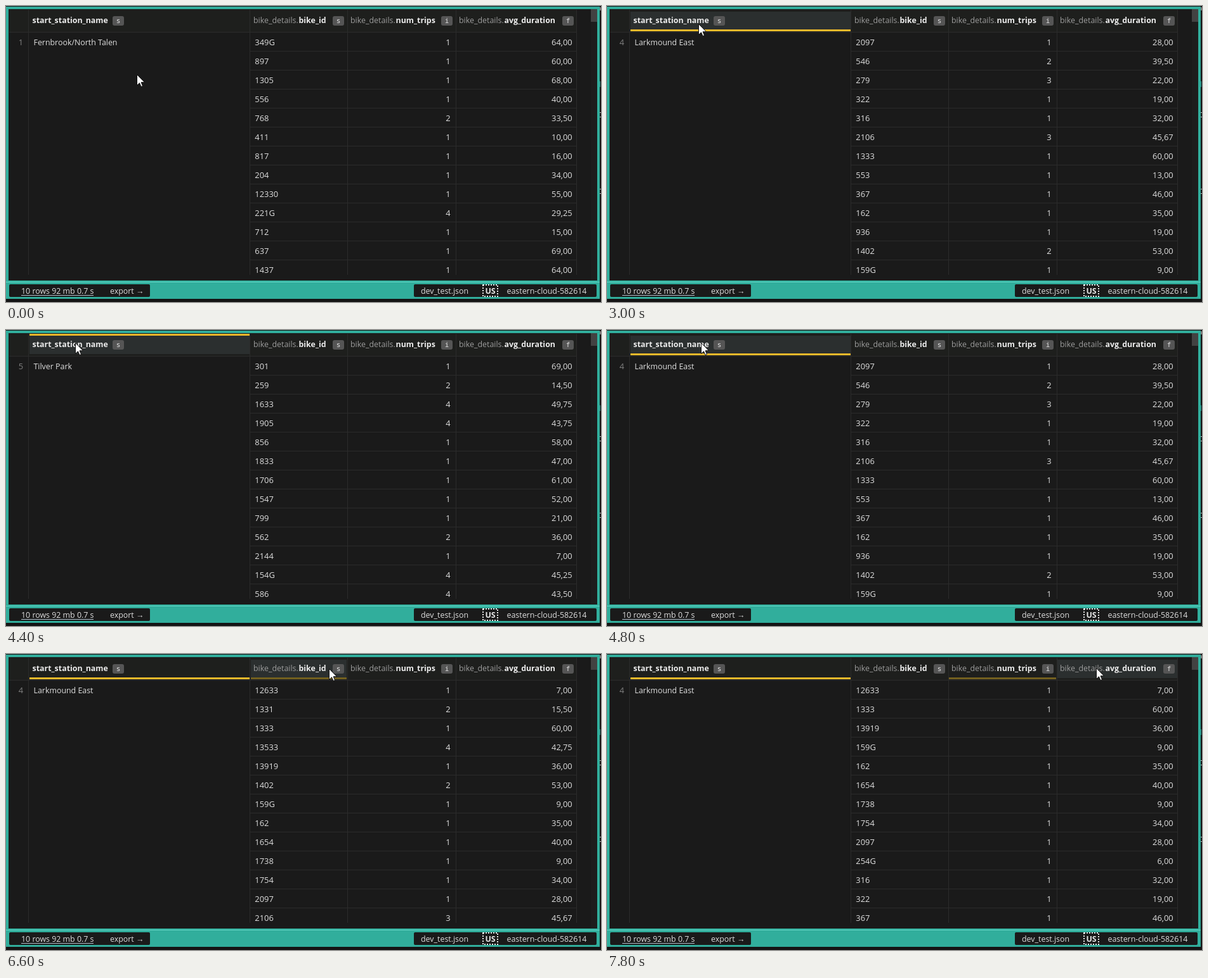
Recreate the animation shown at these times as an HTML page with a canvas. Size 938x468 px, loop 8000 ms.

```html
<!DOCTYPE html>
<html lang="en">
<head>
<meta charset="utf-8">
<title>Sortable results table</title>
<style>
  html, body { margin: 0; width: 100%; height: 100%; overflow: hidden; background: #141414; }
  canvas { display: block; }
</style>
</head>
<body>
<canvas id="stage" width="938" height="468"></canvas>
<script>
const ctx = document.getElementById('stage').getContext('2d');
const LOOP = 8000, STEP = 200, ROW = 30, VISIBLE = 13;
const TEAL = '#31ae9c', BG = '#1a1a1a', LINE = '#2b2b2b', TEXT = '#dedede';
const YELLOW = '#efb92b', DIM = '#73601f';
const SANS = '"Open Sans", "Noto Sans", sans-serif';
const BODY = `12.9px ${SANS}`, LABEL = `12.4px ${SANS}`, BOLD = `bold 12.4px ${SANS}`;
const BADGE = '11px "DejaVu Sans Mono", monospace';

const columns = [
  { x: 37, end: 384, name: 'start_station_name', badge: 's', badgeX: 168 },
  { x: 386, end: 537, nested: true, name: 'bike_id', badge: 's' },
  { x: 539, end: 708, nested: true, name: 'num_trips', badge: 'i' },
  { x: 710, end: 899, nested: true, name: 'avg_duration', badge: 'f' }
];

function randomFrom(seed) {
  return () => {
    seed = (seed * 1664525 + 1013904223) % 4294967296;
    return seed / 4294967296;
  };
}

// Bike ids mix three to five digits, some with a letter; durations are means over trips.
function makeRows(seed, firstId) {
  const random = randomFrom(seed);
  const between = (low, high) => Math.floor(low + random() * (high - low));
  const makeId = () => {
    const kind = random();
    if (kind < 0.1) return between(10, 360).toString().padStart(3, '0') + 'G';
    if (kind < 0.2) return String(between(12000, 14900));
    if (kind < 0.5) return String(between(1250, 2300));
    return String(between(100, 960));
  };
  return Array.from({ length: 32 }, (_, i) => {
    const id = i ? makeId() : firstId;
    const trips = Math.ceil(4 * random() ** 3);
    let total = 0;
    for (let n = 0; n < trips; n++) total += between(5, 70);
    return { id, trips, duration: (total / trips).toFixed(2).replace('.', ',') };
  });
}

const byId = (a, b) => (a.id < b.id ? -1 : a.id > b.id ? 1 : 0);
const byTrips = (a, b) => a.trips - b.trips;

const unsorted = { no: 1, station: 'Fernbrook/North Talen', rows: makeRows(7, '349G') };
const rising = { no: 4, station: 'Larkmound East', rows: makeRows(23, '2097'), sort: 'asc' };
const falling = { no: 5, station: 'Tilver Park', rows: makeRows(41, '301'), sort: 'desc' };
const idSorted = { ...rising, rows: [...rising.rows].sort(byId), dim: 1 };
const tripSorted = { ...rising, rows: [...idSorted.rows].sort(byTrips), dim: 2 };

function stateAt(t) {
  if (t < 2800) return unsorted;
  if (t < 3800) return rising;
  if (t < 4800) return falling;
  if (t < 5600) return rising;
  return t < 7000 ? idSorted : tripSorted;
}

// Each move eases the pointer to a new place.
const home = { x: 206, y: 108 };
const moves = [
  { from: 0, to: 800, x: 149, y: 33 },
  { from: 1000, to: 1400, x: 144, y: 28 },
  { from: 3600, to: 4400, x: 109, y: 20 },
  { from: 4600, to: 5600, x: 480, y: 22 },
  { from: 6400, to: 7000, x: 591, y: 25 },
  { from: 7200, to: 7800, x: 771, y: 22 }
];

function pointerAt(t) {
  return moves.reduce((p, m) => {
    const u = Math.min(1, Math.max(0, (t - m.from) / (m.to - m.from)));
    const k = u * u * (3 - 2 * u);
    return { x: p.x + (m.x - p.x) * k, y: p.y + (m.y - p.y) * k };
  }, home);
}

function box(x, y, w, h, color, radius = 0) {
  ctx.fillStyle = color;
  ctx.beginPath();
  ctx.roundRect(x, y, w, h, radius);
  ctx.fill();
}

function write(text, x, y, color = TEXT, font = BODY, align = 'left') {
  ctx.font = font;
  ctx.textAlign = align;
  ctx.fillStyle = color;
  ctx.fillText(text, x, y);
}

function drawFrame() {
  box(0, 0, 938, 468, '#141414');
  box(0, 1, 936, 462, TEAL);
  box(4, 5, 928, 429, BG);
  box(0, 436, 936, 1, '#62d8c8');
  box(922, 5, 10, 429, '#1d1d1d');
  box(922, 5, 10, 20, '#424242');
  // Slivers of the window behind
  box(936, 2, 2, 5, '#777');
  box(936, 119, 1, 9, '#287f78');
  for (const y of [168, 289]) {
    box(936, y, 2, 1, '#bbb');
    box(936, y + 7, 2, 1, '#bbb');
  }
}

function drawHeader(state, pointer) {
  box(5, 6, 895, 35, '#1e1f1d');
  columns.forEach((c, i) => {
    const w = c.end - c.x;
    const hover = pointer.y >= 6 && pointer.y < 41 && pointer.x >= c.x && pointer.x < c.end;
    if (hover) box(c.x, 9, w, 29, '#2b2f2f');
    if (i === 0 && state.sort) box(c.x, state.sort === 'asc' ? 37 : 6, w, 3, YELLOW);
    if (i === state.dim) box(c.x, 37, w, 3, DIM);
    if (c.nested) write('bike_details.', c.x + 4, 27, '#9c9c9c', LABEL);
    write(c.name, c.x + (c.nested ? 75.5 : 4.5), 27, '#ececec', BOLD);
    const badgeX = c.badgeX ?? c.end - 22;
    box(badgeX, 16, 18, 15, '#555', 3);
    write(c.badge, badgeX + 9, 27, '#e2e2e2', BADGE, 'center');
  });
}

function drawRows(state) {
  ctx.save();
  ctx.beginPath();
  ctx.rect(5, 5, 915, 420);
  ctx.clip();
  box(5, 41, 895, 1, LINE);
  box(35, 6, 1, 419, LINE);
  for (const c of columns) box(c.nested ? c.end + (c.end < 899 ? 1 : 0) : c.end, 6, 1, 419, LINE);
  write(state.no, 23.5, 62, '#808080', BODY, 'center');
  write(state.station, 43.5, 62, TEXT, LABEL);
  state.rows.slice(0, VISIBLE).forEach((row, i) => {
    const y = 62 + i * ROW;
    write(row.id, 392.3, y);
    write(row.trips, 700.7, y, TEXT, BODY, 'right');
    write(row.duration, 892.7, y, TEXT, BODY, 'right');
    box(385, y + 9, 515, 1, LINE);
  });
  ctx.restore();
}

function drawFooter() {
  box(5, 440, 222, 20, BG, 2);
  box(643, 440, 288, 20, BG, 2);
  write('10 rows 92 mb 0.7 s', 24, 455, TEXT, LABEL);
  box(24, 457, 114, 1, '#b5c7d2');
  write('export →', 164, 455, TEXT, LABEL);
  write('dev_test.json', 654, 455, TEXT, LABEL);
  write('eastern-cloud-582614', 789.5, 455, TEXT, LABEL);
  write('US', 763.5, 455, '#e8e8e8', BOLD, 'center');
  ctx.strokeStyle = '#e2e2e2';
  ctx.lineWidth = 2;
  ctx.setLineDash([2, 2]);
  ctx.strokeRect(752, 441, 23, 18);
  ctx.setLineDash([]);
}

function drawPointer({ x, y }) {
  const arrow = new Path2D('M0 0V17L4 13.2L6.5 19L9 18L6.6 12.2H12Z');
  ctx.save();
  ctx.translate(Math.round(x) + 0.5, Math.round(y) + 0.5);
  ctx.fillStyle = '#fff';
  ctx.strokeStyle = '#111';
  ctx.lineWidth = 1;
  ctx.fill(arrow);
  ctx.stroke(arrow);
  ctx.restore();
}

function render(now) {
  const t = Math.floor((now % LOOP) / STEP) * STEP;
  const state = stateAt(t), pointer = pointerAt(t);
  drawFrame();
  drawHeader(state, pointer);
  drawRows(state);
  drawFooter();
  drawPointer(pointer);
}

const start = performance.now();
function tick() {
  render(performance.now() - start);
  requestAnimationFrame(tick);
}
tick();
</script>
</body>
</html>
```
